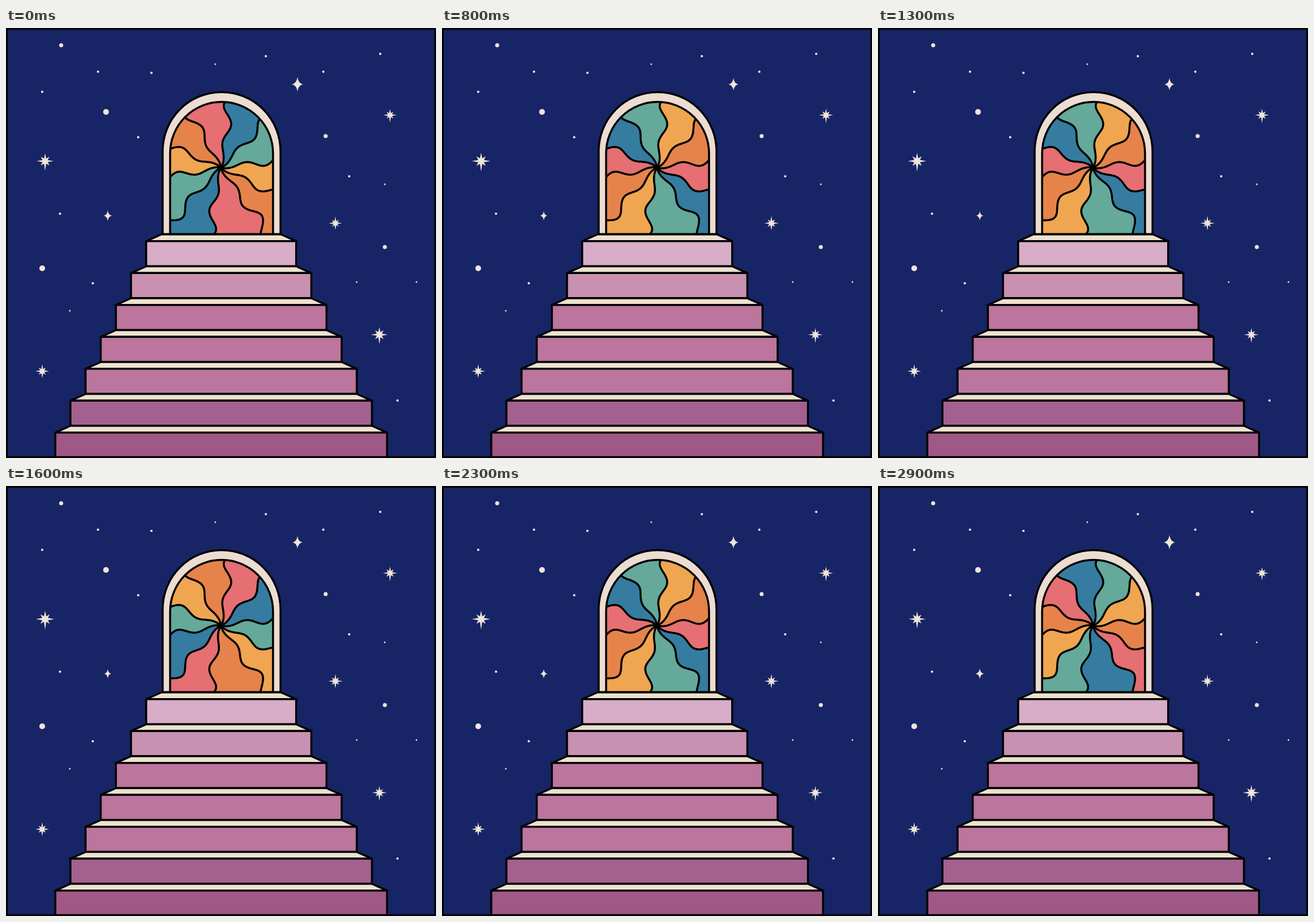
Write an HTML page with a canvas that moves like this. It is 748 by 748 pixels and loops after 3 s.

```html
<!DOCTYPE html>
<html lang="en">
<head>
<meta charset="utf-8">
<title>Stairway to the window</title>
<style>
  html, body { margin: 0; width: 100%; height: 100%; overflow: hidden; background: #172566; }
  canvas { display: block; width: 748px; height: 748px; }
</style>
</head>
<body>
<canvas id="stage" width="748" height="748"></canvas>
<script>
const ctx = document.getElementById('stage').getContext('2d');
const SIZE = 748, LOOP = 3000, STEP = 100;
const INK = '#000', SKY = '#172566', STAR = '#f1e4d8', FRAME = '#ecdcd2', TREAD = '#ece2cf';
const RISERS = ['#d8adc8', '#c891b1', '#bc759d', '#bc759d', '#bc759d', '#a4608f', '#a05886'];
const RAYS = ['#e56f72', '#357ca0', '#64a99a', '#f0a551', '#e6834a'];
const HUB = { x: 374, y: 243 };
const SEAM_ANGLES = [-82, -46, -8, 26, 55, 100, 133, 169, 202, 240];
const SEAM_REACH = 170;

// Dot positions grouped by radius
const DOTS = [
  { radius: 5, at: [[174, 146], [63, 418]] },
  { radius: 3.5, at: [[96, 30], [556, 188], [659, 381]] },
  { radius: 2.1, at: [[160, 76], [253, 78], [452, 49], [552, 76], [651, 45], [63, 111],
    [230, 190], [597, 258], [94, 323], [151, 444], [681, 648]] },
  { radius: 1.4, at: [[364, 63], [659, 272], [111, 492], [610, 442], [714, 442]] }
];

// Pulse is the scale on odd steps; tail lengthens the lower tip
const STARS = [
  { x: 507, y: 98, size: 10, pulse: 0.87 },
  { x: 177, y: 326.5, size: 7.3, pulse: 0.87 },
  { x: 649.5, y: 533.5, size: 14.5, pulse: 0.87, points: 8, tail: true },
  { x: 668, y: 151.5, size: 11.5, pulse: 1.08, points: 8, tail: true },
  { x: 68, y: 231.5, size: 14.8, pulse: 1.08, points: 8, tail: true },
  { x: 573, y: 339.5, size: 11.5, pulse: 1.08, points: 8 },
  { x: 63, y: 597, size: 12, pulse: 1, points: 8 }
];

const radians = degrees => degrees * Math.PI / 180;

function polar(degrees, r) {
  return [r * Math.cos(radians(degrees)), r * Math.sin(radians(degrees))];
}

function fill(color) {
  ctx.fillStyle = color;
  ctx.fill();
}

function outline(color) {
  if (color) fill(color);
  ctx.strokeStyle = INK;
  ctx.lineWidth = 3.5;
  ctx.stroke();
}

function disc(x, y, radius, color) {
  ctx.beginPath();
  ctx.arc(x, y, radius, 0, Math.PI * 2);
  fill(color);
}

function trace(points) {
  ctx.beginPath();
  points.forEach(p => ctx.lineTo(...p));
}

function polygon(points) {
  trace(points);
  ctx.closePath();
}

function arch(left, right, top, bottom) {
  const r = (right - left) / 2;
  ctx.beginPath();
  ctx.moveTo(left, bottom);
  ctx.arc(left + r, top + r, r, Math.PI, 0);
  ctx.lineTo(right, bottom);
  ctx.closePath();
}

// A spoke that ripples sideways with distance and curls near the hub
function seam(angle) {
  const points = [];
  for (let r = 0; r <= SEAM_REACH; r += 2) {
    const ripple = 5.5 * Math.cos(2 * Math.PI * (r - 74) / 68);
    const curl = 20 * Math.exp(-r / 12);
    const [dx, dy] = polar(angle + ripple + curl, r);
    points.push([HUB.x + dx, HUB.y + dy]);
  }
  return points;
}
const SEAMS = SEAM_ANGLES.map(seam);

// Four tips joined by hollow curves
function sparkle(size) {
  const height = size * 1.27;
  const waist = size * 0.14;
  ctx.beginPath();
  ctx.moveTo(size, 0);
  ctx.quadraticCurveTo(waist, waist, 0, height);
  ctx.quadraticCurveTo(-waist, waist, -size, 0);
  ctx.quadraticCurveTo(-waist, -waist, 0, -height);
  ctx.quadraticCurveTo(waist, -waist, size, 0);
}

function burst(size, tail) {
  const points = [];
  for (let i = 0; i < 16; i++) {
    const ratio = i % 2 ? 0.33 : i % 4 ? 0.72 : 1;
    points.push(polar(i * 22.5, size * ratio));
  }
  if (tail) {
    points[4][1] *= 1.14;
    points[12][1] *= 0.91;
  }
  polygon(points);
}

function drawStar({ x, y, size, pulse, points, tail }, odd) {
  const scaled = size * (odd ? pulse : 1);
  ctx.save();
  ctx.translate(x, y);
  if (points === 8) burst(scaled, tail);
  else sparkle(scaled);
  fill(STAR);
  ctx.restore();
}

function drawWindow(step) {
  arch(272.5, 477.5, 111.5, 358.5);
  outline(FRAME);

  ctx.save();
  arch(285.5, 464.5, 128.5, 358.5);
  ctx.clip();
  SEAMS.forEach((edge, i) => {
    const next = SEAMS[(i + 1) % SEAMS.length];
    polygon([...edge, ...[...next].reverse()]);
    fill(RAYS[(i + 1 + 4 * step) % RAYS.length]);
  });
  SEAMS.forEach(edge => {
    trace(edge);
    outline();
  });
  ctx.restore();

  disc(HUB.x, HUB.y, 5, INK);
  arch(285.5, 464.5, 128.5, 358.5);
  outline();
}

function drawStairs() {
  RISERS.forEach((color, i) => {
    const left = 243.8 - 26.35 * i, right = 504.8 + 26.35 * i;
    const top = 359 + 55.5 * i, edge = top + 11.8;
    const bottom = Math.min(top + 55.5, SIZE - 1.5);
    polygon([[left + 26.5, top], [right - 26.5, top], [right, edge], [left, edge]]);
    outline(TREAD);
    polygon([[left, edge], [right, edge], [right, bottom], [left, bottom]]);
    outline(color);
  });
}

function draw(time) {
  const step = Math.floor((time % LOOP) / STEP) % RAYS.length;
  ctx.lineCap = ctx.lineJoin = 'round';
  ctx.fillStyle = SKY;
  ctx.fillRect(0, 0, SIZE, SIZE);
  DOTS.forEach(({ radius, at }) => at.forEach(([x, y]) => disc(x, y, radius, STAR)));
  STARS.forEach(star => drawStar(star, step % 2 === 1));
  drawWindow(step);
  drawStairs();
  ctx.lineWidth = 3;
  ctx.strokeRect(1.5, 1.5, SIZE - 3, SIZE - 3);
}

const start = performance.now();
function tick() {
  draw(performance.now() - start);
  requestAnimationFrame(tick);
}
tick();
</script>
</body>
</html>
```
